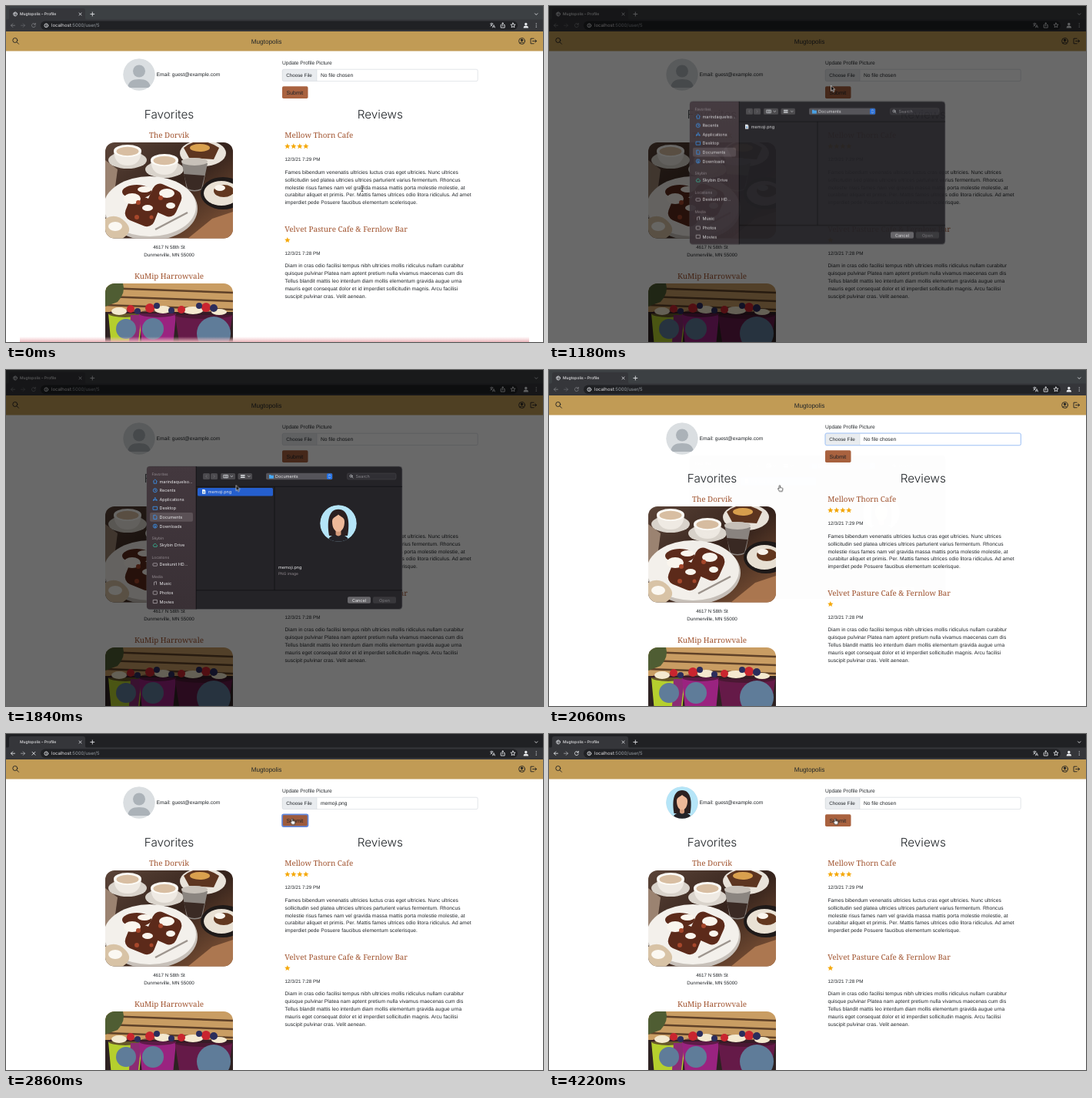
Recreate the animation shown at these times as an HTML page. Size 698 by 436 pixels, loop 4720 ms.

```html
<!DOCTYPE html>
<html lang="en">
<head>
<meta charset="utf-8">
<title>Profile page</title>
<style>
html, body { margin: 0; width: 100%; height: 100%; overflow: hidden; background: #fff; }
svg { display: block; width: 100vw; height: 100vh; }
text { font: 6.65px "Liberation Sans", Arial, sans-serif; fill: #212529; text-rendering: geometricPrecision; white-space: pre; }
.body { letter-spacing: .06px; }
.small { font-size: 6.25px; }
.head { font: 300 15.3px Inter, sans-serif; text-anchor: middle; }
.brand { font-size: 8.2px; text-anchor: middle; }
.name { font: 9.8px "Noto Serif", serif; fill: #a0522d; }
.mid { text-anchor: middle; }
.ui text { font: 5.5px Inter, sans-serif; fill: #e6e6e8; }
.ui .label { font-size: 4.9px; fill: #938b90; }
.ui .tab { font-size: 5px; font-weight: 500; }
.ui .url { font-size: 6px; }
.line { fill: none; stroke: #dfe1e5; stroke-width: .9; stroke-linecap: round; stroke-linejoin: round; }
.ink { stroke: #222; }
.blue { fill: none; stroke: #3b96f3; stroke-width: .8; stroke-linejoin: round; }

/* one shared clock: 1% = 47.2 ms */
.a { animation: 4.72s linear infinite; }
.step { animation-timing-function: step-end; }
#strip { animation-name: strip; }
#nav { animation-name: nav; }
#glow { animation-name: glow; }
#hover { animation-name: hover; }
#ring { animation-name: ring; }
#press { animation-name: press; }
.busy { animation-name: busy; }
.idle { animation-name: idle; }
.chosen { animation-name: chosen; }
.empty { animation-name: empty; }
.new { animation-name: new; }
#dim { animation-name: dim; }
#sheet { animation-name: sheet; }
#pick { animation-name: pick; }
#pointer { animation-name: pointer; }
#beam { animation-name: beam; }
#arrow { animation-name: arrow; }
#hand { animation-name: hand; }

@keyframes strip { 0%, 21.2%, 100% { fill: #3c4043 } 6.4%, 45.4% { fill: #202124 } }
@keyframes nav { 0%, 21.2%, 100% { opacity: .4 } 6.4%, 45.4% { opacity: 1 } }
@keyframes glow { 0% { opacity: 1 } 5%, 100% { opacity: 0 } }
@keyframes hover { 0%, 22.5%, 100% { opacity: 0 } 13.5% { opacity: 1 } }
@keyframes ring { 0%, 58.5%, 100% { opacity: 0 } 43.2% { opacity: 1 } }
@keyframes press { 0%, 66.5%, 100% { opacity: 0 } 58.5% { opacity: 1 } }
@keyframes busy { 0%, 66.5%, 100% { opacity: 0 } 59% { opacity: 1 } }
@keyframes idle { 0%, 66.5%, 100% { opacity: 1 } 59% { opacity: 0 } }
@keyframes chosen { 0%, 66.5%, 100% { opacity: 0 } 45.4% { opacity: 1 } }
@keyframes empty { 0%, 66.5%, 100% { opacity: 1 } 45.4% { opacity: 0 } }
@keyframes new { 0%, 100% { opacity: 0 } 66.5% { opacity: 1 } }
@keyframes dim { 0%, 21.2% { opacity: 0 } 25%, 39.8% { opacity: 1 } 43.2%, 100% { opacity: 0 } }
@keyframes sheet {
  0%, 21.2% { opacity: 0; transform: translateY(-14px) }
  25.4%, 40.2% { opacity: 1; transform: none }
  43.7%, 100% { opacity: 0; transform: translateY(-14px) }
}
@keyframes pick { 0%, 100% { opacity: 0 } 34% { opacity: 1 } }
@keyframes pointer {
  0%, 3% { transform: translate(463px, 237px); animation-timing-function: ease-in-out }
  15%, 22% { transform: translate(395.5px, 92.5px); animation-timing-function: ease-in-out }
  30.1% { transform: translate(300.5px, 143px) }
  32%, 45.4% { transform: translate(300.5px, 153.5px); animation-timing-function: ease-in-out }
  55%, 100% { transform: translate(372.5px, 113.5px) }
}
@keyframes beam { 0%, 100% { opacity: 1 } 6% { opacity: 0 } }
@keyframes arrow { 0%, 13.5%, 42%, 54%, 100% { opacity: 0 } 6%, 22.5%, 46.5% { opacity: 1 } }
@keyframes hand { 0%, 22.5%, 46.5%, 100% { opacity: 0 } 13.5%, 42%, 54% { opacity: 1 } }
</style>
</head>
<body>
<svg viewBox="0 0 698 436" preserveAspectRatio="none">
<defs>
  <clipPath id="brunch"><rect x="129" y="177" width="166" height="124.500" rx="12"/></clipPath>
  <clipPath id="bowls"><rect x="129" y="360" width="166" height="124" rx="12"/></clipPath>
  <clipPath id="round"><circle r="20.800"/></clipPath>
  <linearGradient id="table" x2="1" y2="1">
    <stop stop-color="#5b4438"/><stop offset=".5" stop-color="#35231c"/><stop offset="1" stop-color="#8a5a3a"/>
  </linearGradient>
  <linearGradient id="side" x2="0" y2="1"><stop stop-color="#43383e"/><stop offset="1" stop-color="#393035"/></linearGradient>
  <linearGradient id="pink" x2="0" y2="1"><stop stop-color="#f6c8cc" stop-opacity="0"/><stop offset="1" stop-color="#e9b3b8"/></linearGradient>
  <path id="star" d="M0-3.600L1.050-1.150 3.700-.900 1.700.800 2.300 3.400 0 2-2.300 3.400-1.700.800-3.700-.900-1.050-1.150Z" fill="#f5a90c"/>
  <symbol id="portrait" viewBox="-21 -21 42 42" overflow="visible">
    <g clip-path="url(#round)">
      <circle r="21" fill="#b5e5f8"/>
      <path d="M-10.500 14C-13 0-12-16 0-16S13 0 10.500 14Z" fill="#2c2020"/>
      <path d="M-12 22C-12 15-7 13 0 13S12 15 12 22Z" fill="#242328"/>
      <path d="M-3 6h6v7q-3 3-6 0Z" fill="#d59b7b"/>
      <path d="M-7-2C-7-7-3-7 0-10C3-7 7-7 7-2C7 5 4 9.500 0 9.500S-7 5-7-2Z" fill="#eeb999"/>
    </g>
  </symbol>
  <g id="cup">
    <ellipse cy="6" rx="25" ry="11" fill="#d9d3cb"/>
    <path d="M-18-6C-17 8-10 13 0 13S17 8 18-6Z" fill="#efeae3"/>
    <ellipse cy="-6" rx="18" ry="8" fill="#fdfbf6"/>
    <ellipse cy="-5.500" rx="14.500" ry="5.800" fill="#d8bea2"/>
  </g>
  <g id="bowl">
    <path d="M-22-15H22L17 40H-17Z"/>
    <ellipse cy="-15" rx="22" ry="5" fill="#3d1728" opacity=".65"/>
  </g>
</defs>

<rect width="698" height="436" fill="#fff"/>

<!-- page header -->
<rect y="33" width="698" height="25.500" fill="#c19b55"/>
<text class="brand" x="338.500" y="48.500">Mugtopolis</text>
<g class="line ink">
  <circle cx="11.800" cy="44.500" r="3"/><path d="M14 46.800l2.500 2.500"/>
  <circle cx="670.500" cy="45.500" r="3.900"/><circle cx="670.500" cy="44.300" r="1.200" fill="#222"/><path d="M668 48.200q2.500-2.800 5 0"/>
  <path d="M686 42.200h-4v6.600h4M684.500 45.500h5M687.800 43.700l1.900 1.800-1.900 1.800"/>
</g>

<!-- profile -->
<g transform="translate(173 89)">
  <g clip-path="url(#round)">
    <circle r="21" fill="#dadee1"/>
    <circle cy="-4.500" r="8" fill="#abb2b8"/>
    <path d="M-15 17C-14 9-9 6 0 6S14 9 15 17Z" fill="#abb2b8"/>
  </g>
  <use class="a step new" href="#portrait" x="-21" y="-21" width="42" height="42"/>
</g>
<text x="195.500" y="91.300">Email: guest@example.com</text>
<text x="359" y="75.800">Update Profile Picture</text>

<g>
  <path d="M404 82.200H361q-2 0-2 2V95.500q0 2 2 2H404Z" fill="#e9ecef"/>
  <path id="hover" class="a step" d="M404 82.200H361q-2 0-2 2V95.500q0 2 2 2H404Z" fill="#d3d6d9"/>
  <rect x="359.200" y="82.200" width="254" height="15.400" rx="2" fill="none" stroke="#ced4da" stroke-width=".6"/>
  <path d="M404 82.500v15" stroke="#ced4da" stroke-width=".5"/>
  <rect id="ring" class="a step" x="359" y="82" width="254.400" height="15.800" rx="2" fill="none" stroke="#a3c6fb"/>
  <text class="small" x="364.300" y="92">Choose File</text>
  <text class="a step empty" x="409" y="92">No file chosen</text>
  <text class="a step chosen" x="409" y="92">memoji.png</text>
</g>
<rect x="359" y="104.300" width="33.500" height="15.800" rx="1.800" fill="#a9623f"/>
<rect id="press" class="a step" x="359" y="104.300" width="33.500" height="15.800" rx="2" fill="#9d5b3d" stroke="#6188dd" stroke-width="1.700"/>
<text x="364.500" y="114.500" style="font-size:7px">Submit</text>

<!-- favorites -->
<text class="head" x="212" y="145.800">Favorites</text>
<text class="name mid" x="212" y="171">The Dorvik</text>
<g clip-path="url(#brunch)">
  <rect x="129" y="177" width="166" height="125" fill="url(#table)"/>
  <path d="M129 200l16 12-4 30-12 8Z" fill="#9b8371"/>
  <ellipse cx="256" cy="191" rx="30" ry="17" fill="#e9e3da"/>
  <path d="M231 184q20-17 46 0l-7 15-32-2Z" fill="#5d3520"/>
  <ellipse cx="252" cy="184" rx="13" ry="5" fill="#d9a04e"/>
  <use href="#cup" x="158" y="194"/>
  <use href="#cup" x="206" y="206"/>
  <path d="M228 200l34 4-7 34q-10 5-20 0Z" fill="#8b8580"/>
  <path d="M231 218l27 2-4 17q-9 4-18 0Z" fill="#3a2a24"/>
  <ellipse cx="245" cy="202" rx="17" ry="5" fill="#c8c1b9"/>
  <ellipse cx="282" cy="243" rx="29" ry="21" fill="#1f1a19"/>
  <ellipse cx="280" cy="243" rx="23" ry="16" fill="#e9e1d4"/>
  <ellipse cx="283" cy="240" rx="13" ry="8" fill="#63381f"/>
  <ellipse cx="278" cy="236" rx="7" ry="4" fill="#faf5ed"/>
  <path d="M236 302l32-26 27-9v35Z" fill="#ac7750"/>
  <ellipse cx="188" cy="263" rx="61" ry="41" fill="#c7c0b9"/>
  <ellipse cx="187" cy="260" rx="60" ry="39" fill="#f3f0eb"/>
  <g fill="#5c2a1a">
    <rect x="157" y="248" width="40" height="35" rx="10" transform="rotate(22 177 265)"/>
    <rect x="186" y="234" width="40" height="36" rx="10" transform="rotate(24 206 252)"/>
    <ellipse cx="170" cy="241" rx="19" ry="9"/>
  </g>
  <g fill="#faf5ed">
    <ellipse cx="164" cy="250" rx="11" ry="7"/>
    <ellipse cx="180" cy="238" rx="9" ry="4"/>
    <ellipse cx="209" cy="243" rx="10" ry="6"/>
    <ellipse cx="184" cy="262" rx="7" ry="4"/>
    <ellipse cx="214" cy="259" rx="6" ry="4"/>
  </g>
  <path d="M129 276q14-8 26 4t-4 22h-22Z" fill="#d8c3a6"/>
  <ellipse cx="142" cy="286" rx="9" ry="6" fill="#fbf8f2"/>
  <g fill="#a7472b">
    <circle cx="172" cy="255" r="3"/><circle cx="170" cy="274" r="3"/><circle cx="201" cy="249" r="3"/><circle cx="189" cy="274" r="2.500"/>
  </g>
  <path d="M194 290L236 268" stroke="#9d958e" stroke-width="2.500"/>
</g>
<text class="small mid" x="212" y="315.300">4617 N 58th St</text>
<text class="small mid" x="212" y="325.300">Dunmerville, MN 55000</text>
<text class="name mid" x="212" y="354">KuMip Harrowvale</text>
<g clip-path="url(#bowls)">
  <rect x="129" y="360" width="166" height="80" fill="#c99d63"/>
  <path d="M129 366l166 6M129 377l166 6M129 388l166 6" stroke="#5f4128" stroke-width="2.500"/>
  <path d="M129 360h23q4 12-7 24l-16 6Z" fill="#4f5d33"/>
  <rect x="129" y="397" width="166" height="40" fill="#2e2222"/>
  <use href="#bowl" transform="translate(155 414)" fill="#b5cf2e"/>
  <path d="M162 401h14l-4 35h-12Z" fill="#8c2c74"/>
  <use href="#bowl" transform="translate(197 414) scale(1.100 1)" fill="#9a2380"/>
  <use href="#bowl" transform="translate(257 416) scale(1.700 1)" fill="#651a48"/>
  <g fill="#f4e9cf"><ellipse cx="147" cy="396" rx="10" ry="5"/><ellipse cx="204" cy="394" rx="11" ry="5"/><ellipse cx="243" cy="395" rx="13" ry="5"/><ellipse cx="277" cy="397" rx="10" ry="4"/></g>
  <g fill="#c9252f"><circle cx="162" cy="393" r="5"/><circle cx="187" cy="392" r="6"/><circle cx="260" cy="391" r="6"/><circle cx="228" cy="394" r="5"/></g>
  <g fill="#2b2d5c"><circle cx="171" cy="396" r="4"/><circle cx="196" cy="389" r="4"/><circle cx="215" cy="395" r="4"/><circle cx="251" cy="389" r="4"/><circle cx="270" cy="392" r="5"/></g>
  <g fill="#5f7c99"><circle cx="156" cy="419" r="13"/><circle cx="191" cy="419" r="14"/><circle cx="270" cy="425" r="22"/></g>
</g>

<!-- reviews -->
<text class="head" x="486.300" y="145.800">Reviews</text>
<text class="name" x="362.300" y="171">Mellow Thorn Cafe</text>
<use href="#star" x="365.800" y="181.800"/><use href="#star" x="373.800" y="181.800"/>
<use href="#star" x="381.800" y="181.800"/><use href="#star" x="389.800" y="181.800"/>
<text class="small" x="362.500" y="200.700">12/3/21 7:29 PM</text>
<text class="body" y="217.600"><tspan x="362.500">Fames bibendum venenatis ultricies luctus cras eget ultricies. Nunc ultrices</tspan><tspan x="362.500" dy="9.950">sollicitudin sed platea ultricies ultrices parturient varius fermentum. Rhoncus</tspan><tspan x="362.500" dy="9.950">molestie risus fames nam vel gravida massa mattis porta molestie molestie, at</tspan><tspan x="362.500" dy="9.950">curabitur aliquet et primis. Per. Mattis fames ultrices odio litora ridiculus. Ad amet</tspan><tspan x="362.500" dy="9.950">imperdiet pede Posuere faucibus elementum scelerisque.</tspan></text>
<text class="name" x="362.300" y="292.500">Velvet Pasture Cafe &amp; Fernlow Bar</text>
<use href="#star" x="365.800" y="303.600"/>
<text class="small" x="362.500" y="322.500">12/3/21 7:28 PM</text>
<text class="body" y="339.300"><tspan x="362.500">Diam in cras odio facilisi tempus nibh ultricies mollis ridiculus nullam curabitur</tspan><tspan x="362.500" dy="9.950">quisque pulvinar Platea nam aptent pretium nulla vivamus maecenas cum dis</tspan><tspan x="362.500" dy="9.950">Tellus blandit mattis leo interdum diam mollis elementum gravida augue urna</tspan><tspan x="362.500" dy="9.950">mauris eget consequat dolor et id imperdiet sollicitudin magnis. Arcu facilisi</tspan><tspan x="362.500" dy="9.950">suscipit pulvinar cras. Velit aenean.</tspan></text>
<rect id="glow" class="a" x="18" y="429" width="662" height="7" fill="url(#pink)"/>

<!-- browser bar -->
<g class="ui">
  <rect id="strip" class="a step" width="698" height="18" fill="#202124"/>
  <path d="M2 18q2 0 2-3V6q0-3 3-3h93q3 0 3 3v9q0 3 2 3Z" fill="#35363a"/>
  <rect y="17.500" width="698" height="15.500" fill="#35363a"/>
  <rect x="45" y="19.500" width="620" height="11.500" rx="5.700" fill="#202124"/>
  <g class="line">
    <g class="a step idle" stroke-width=".7"><circle cx="12" cy="10.500" r="2.500"/><path d="M9.700 10h4.600M12 8q-2 2.500 0 5"/></g>
    <path d="M95 9l3 3M98 9l-3 3M109.800 10.500h5M112.300 8v5M687.500 9.800l1.700 1.700 1.700-1.700"/>
    <g id="nav" class="a step">
      <path d="M11.500 25.200h-5M8.800 22.900l-2.300 2.300 2.300 2.300"/>
      <path d="M19.500 25.200h5M22.200 22.900l2.300 2.300-2.300 2.300" opacity=".6"/>
      <path class="a step idle" d="M37.800 23.500a2.500 2.500 0 1 0 .5 2.400M38.300 22.300v1.800h-1.800"/>
      <path class="a step busy" d="M34 23.200l4 4M38 23.200l-4 4"/>
    </g>
    <circle cx="52.300" cy="25.300" r="2.400"/><path d="M52.300 25v1.300M52.300 23.900v.1"/>
    <path d="M629.500 23h3.500M631.200 22v1M632.500 23q-.8 2.500-2.800 3.200M630 24q.8 1.500 2 2M632.500 28l1.500-3.500 1.500 3.500M633 27h2" stroke-width=".7"/>
    <path d="M644 24.500h-.8v3.600h5v-3.600h-.8M645.700 26v-4M644.500 23l1.200-1.200 1.200 1.200"/>
    <path d="M659 22l.9 2 2.200.2-1.700 1.400.5 2.200-1.900-1.100-1.900 1.100.5-2.200-1.700-1.400 2.200-.2Z"/>
  </g>
  <g fill="#e8eaed">
    <circle cx="675.800" cy="23.500" r="1.700"/><path d="M672.600 28.500q0-3 3.200-3t3.200 3Z"/>
    <circle cx="689.200" cy="22.800" r=".6"/><circle cx="689.200" cy="25" r=".6"/><circle cx="689.200" cy="27.200" r=".6"/>
  </g>
  <text class="tab" x="18" y="12.300">Mugtopolis – Profile</text>
  <text class="url" x="59" y="27.400">localhost<tspan fill="#9aa0a6">:5000/user/5</tspan></text>
</g>

<rect id="dim" class="a" width="698" height="436" fill="#000" fill-opacity=".59"/>

<!-- file sheet -->
<g id="sheet" class="a ui">
  <rect x="183" y="125" width="332" height="185.500" rx="4" fill="#242327" stroke="#58585b" stroke-width=".7"/>
  <path d="M247 125.300H187q-4 0-4 4v177q0 4 4 4h60Z" fill="url(#side)"/>
  <path d="M247.200 125v185.500M247 151.300h268M349 151.300v134.500M247 285.800h268" stroke="#111114" stroke-width=".8"/>
  <rect x="187" y="185" width="56" height="11.800" rx="2" fill="#5b5156"/>
  <text class="label" x="189.500" y="137">Favorites</text>
  <text class="label" x="189.500" y="220">Skybin</text>
  <text class="label" x="189.500" y="244.800">Locations</text>
  <text class="label" x="189.500" y="269.800">Media</text>
  <text y="146.500"><tspan x="199.500">marindaquelso...</tspan><tspan x="199.500" dy="11.650">Recents</tspan><tspan x="199.500" dy="11.650">Applications</tspan><tspan x="199.500" dy="11.650">Desktop</tspan><tspan x="199.500" dy="11.650">Documents</tspan><tspan x="199.500" dy="11.650">Downloads</tspan></text>
  <text x="199.500" y="229.400">Skybin Drive</text>
  <text x="199.500" y="254.400">Deskunit HD...</text>
  <text y="279.300"><tspan x="199.500">Music</tspan><tspan x="199.500" dy="11.650">Photos</tspan><tspan x="199.500" dy="11.650">Movies</tspan></text>
  <g class="blue">
    <path d="M191 144.600l2.800-2.500 2.800 2.500M192 144.200v3h3.600v-3"/>
    <circle cx="193.800" cy="156.200" r="2.500"/><path d="M193.800 154.600v1.700h1.200"/>
    <path d="M191.400 170l2.400-4.600 2.400 4.600M191 168.600h5.600"/>
    <rect x="191" y="177.300" width="5.600" height="4"/>
    <path d="M191.800 188.300h2.700l1.400 1.400v3.800h-4.100Z"/>
    <circle cx="193.800" cy="202.600" r="2.500"/><path d="M193.800 201v3M192.600 203l1.200 1.200 1.200-1.200"/>
    <path d="M192 229.300h4q1.500-1.500-.5-2.700-1-2-3-.7-2.300 2-.5 3.400Z" stroke="#35b996"/>
    <rect x="191" y="250.800" width="5.600" height="3.400" rx=".6" stroke="#aaa3a8"/>
    <path d="M192.500 279.300v-4l3-.7v4" stroke="#aaa3a8"/>
    <rect x="191.200" y="287" width="5.200" height="4.200" rx=".6" stroke="#aaa3a8"/>
    <rect x="191.200" y="298.400" width="5.200" height="4.200" stroke="#aaa3a8"/>
  </g>
  <g fill="#4b4a4e">
    <rect x="256" y="134" width="9" height="8" rx="1.500"/><rect x="266" y="134" width="9" height="8" rx="1.500"/>
    <rect x="279" y="134" width="19" height="8" rx="1.500"/><rect x="301.500" y="134" width="18.500" height="8" rx="1.500"/>
    <rect x="338" y="133.800" width="86.500" height="8.400" rx="1.800" fill="#55545a"/>
    <rect x="417" y="134.300" width="7" height="7.400" rx="1.500" fill="#2673e6"/>
    <rect x="443.500" y="134" width="63.500" height="8" rx="1.800" fill="#302f34" stroke="#4a494d" stroke-width=".5"/>
    <rect x="444" y="294.300" width="30" height="8.500" rx="1.800" fill="#68676b"/>
    <rect x="477" y="294.300" width="30" height="8.500" rx="1.800" fill="#38373b"/>
  </g>
  <path d="M342 136h2l.8.800h3v4H342Z" fill="#47a9f5"/>
  <g class="line" style="stroke-width:.7">
    <path d="M261 136.500l-1.300 1.500 1.300 1.500M270 136.500l1.300 1.500-1.300 1.500" stroke="#77767a"/>
    <path d="M283 136.300h5.500v3.500H283ZM284.800 136.300v3.500M286.700 136.300v3.500M292 137.400l1.300 1.300 1.300-1.300M314.500 137.400l1.300 1.300 1.300-1.300"/>
    <path d="M305.500 136.800h4.500M305.500 139.300h4.500" stroke-dasharray="1.200 .5" stroke-width="1.500"/>
    <path d="M419.300 137l1.200-1.200 1.200 1.200M419.300 139l1.200 1.200 1.200-1.200"/>
    <circle cx="448.500" cy="137.600" r="1.500"/><path d="M449.700 138.800l1.200 1.200"/>
  </g>
  <text x="350" y="140">Documents</text>
  <text x="454.500" y="140" style="fill:#87868b">Search</text>
  <text class="mid" x="459" y="300.500">Cancel</text>
  <text class="mid" x="492" y="300.500" style="fill:#77767a">Open</text>
  <g id="pick" class="a step">
    <rect x="249" y="153" width="98" height="10.500" rx="1.500" fill="#255fce"/>
    <use href="#portrait" x="408" y="175" width="48" height="48"/>
    <text x="354" y="258">memoji.png</text>
    <text class="label" x="354" y="266">PNG image</text>
  </g>
  <path d="M255 155h3l1.300 1.300v4.500H255Z" fill="#edf0f5"/><circle cx="257.200" cy="158.500" r="1" fill="#4591d8"/>
  <text x="262.800" y="160">memoji.png</text>
</g>

<!-- pointer -->
<g id="pointer" class="a">
  <path id="beam" class="a step" d="M-1.500-3.800q1.500 0 1.500 1V2.800q0 1 1.500 1M1.500-3.800q-1.500 0-1.500 1M0 2.800q0 1-1.500 1" fill="none" stroke="#222" stroke-width=".8"/>
  <path id="arrow" class="a step" d="M-1.500-4V3.200L.2 1.700 1.400 4.400 2.700 3.800 1.500 1.200H3.700Z" fill="#111" stroke="#fff" stroke-width=".6"/>
  <path id="hand" class="a step" transform="scale(.87)" d="M-1.600.6V-3.300q.1-1 .9-1t.9 1V-.9q1-.5 1.400.3 1-.3 1.300.5 1.100-.1 1.100.9 0 1.700-.8 2.700V4.500H-1.200Q-2 2.700-3.300 1.200q-.3-1.200.6-1.200Z" fill="#fff" stroke="#111" stroke-width=".8"/>
</g>
</svg>
</body>
</html>
```
